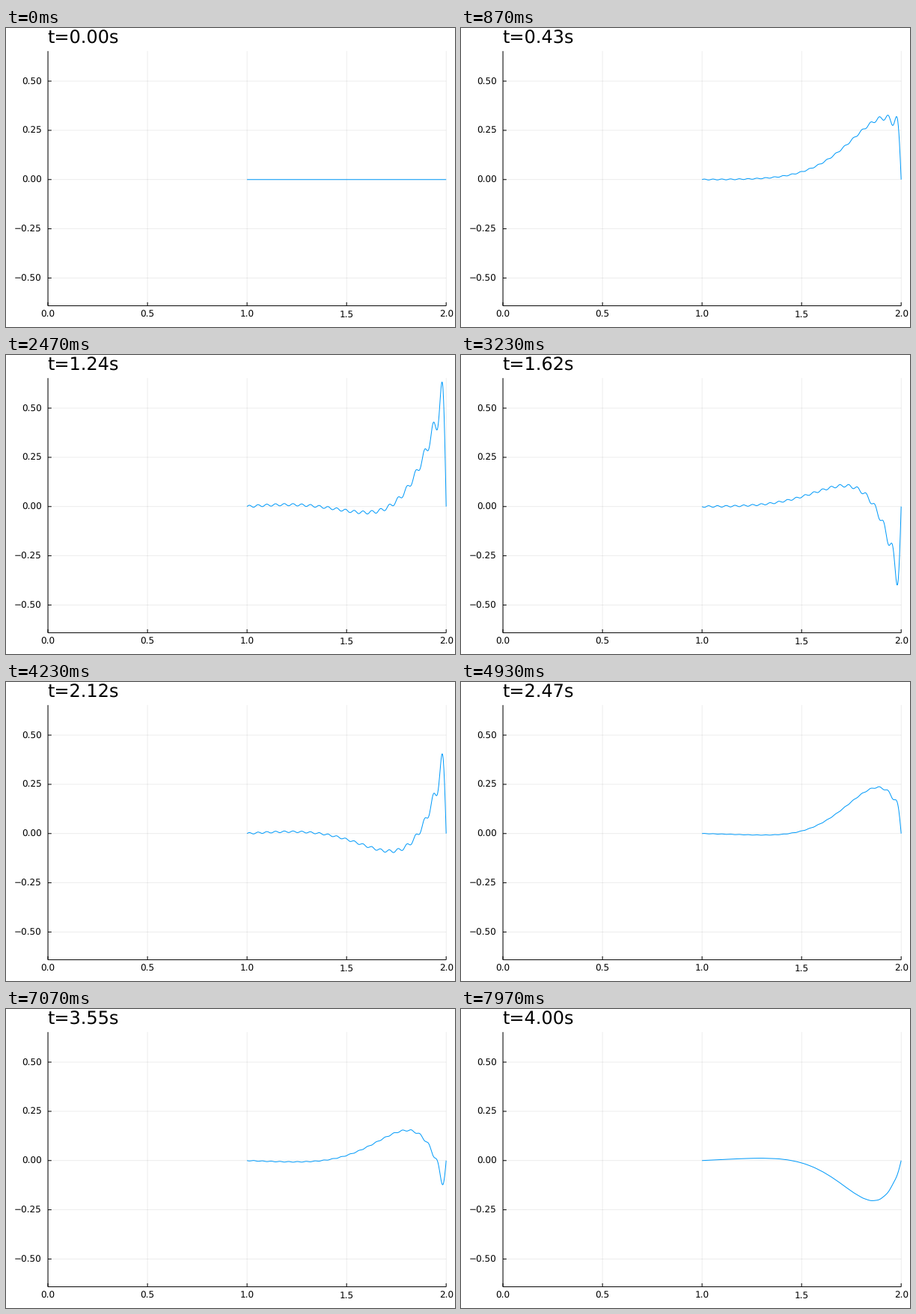
Recreate the animation shown at these times as a matplotlib script. Size 600 px wide and 400 px high, loop 8000 ms.

```python
import numpy as np
import matplotlib.pyplot as plt
from matplotlib.animation import FuncAnimation

# Viscous flow in an annulus 1 < r < 2 whose outer wall oscillates,
# expanded in a truncated set of radial eigenmodes.
TICK_MS = 20
TICKS = 400
DT = 5 / 299
NU = 0.1
AMP = 0.6
OMEGA = 2 * np.pi
MODES = 45
CELLS = 700

# Stage layout in pixels
LEFT, RIGHT, TOP, BOTTOM = 56.05, 588.19, 30.87, 371.61
ZERO_Y, UNIT_Y = 202.75, 263.4
TICK_LEN = 4.72
PX = 0.72  # points per pixel at 100 dpi

plt.rcParams["font.family"] = "DejaVu Sans"
plt.rcParams["text.hinting"] = "none"


def to_x(r):
    return LEFT + r * (RIGHT - LEFT) / 2


def to_y(u):
    return ZERO_Y - u * UNIT_Y


def radial_modes():
    """Decay rates, shapes and wall forcing for w = u * sqrt(r)."""
    h = 1 / CELLS
    r = np.linspace(1, 2, CELLS + 1)
    inner = r[1:-1]
    side = np.full(CELLS - 2, -1 / h**2)
    op = np.diag(2 / h**2 + 0.75 / inner**2) + np.diag(side, 1) + np.diag(side, -1)
    lam, vec = np.linalg.eigh(op)
    lam, vec = lam[:MODES], vec[:, :MODES]
    force = NU * AMP * np.sqrt(2) * vec[-1] / h**2
    return r, NU * lam, vec / np.sqrt(inner)[:, None], force


R, RATE, SHAPE, FORCE = radial_modes()


def velocity(t):
    a = RATE * np.sin(OMEGA * t) - OMEGA * np.cos(OMEGA * t)
    a = FORCE * (a + OMEGA * np.exp(-RATE * t)) / (RATE**2 + OMEGA**2)
    return np.concatenate(([0], SHAPE @ a, [0]))


fig = plt.figure(figsize=(6, 4), dpi=100, facecolor="white")
ax = fig.add_axes([0, 0, 1, 1])
ax.set_xlim(0, 600)
ax.set_ylim(400, 0)
ax.axis("off")


def line(xs, ys, width=1.0, alpha=1.0):
    ax.plot(xs, ys, color="black", lw=width * PX, alpha=alpha, snap=False,
            solid_capstyle="butt")


def grid(xs, ys):
    line(xs, ys, width=0.7, alpha=0.1)


def label(x, y, text, size, ha):
    return ax.text(x, y, text, fontsize=size * PX, ha=ha, va="baseline",
                   color="black")


for v in (0, 0.5, 1, 1.5, 2):
    x = to_x(v)
    grid([x, x], [TOP, BOTTOM])
    line([x, x], [BOTTOM, BOTTOM - TICK_LEN])
    label(x, 387.2, f"{v:.1f}", 12, "center")

for v in (-0.5, -0.25, 0, 0.25, 0.5):
    y = to_y(v)
    grid([LEFT, RIGHT], [y, y])
    line([LEFT, LEFT + TICK_LEN], [y, y])
    label(48, y + 4.32, f"{v:.2f}".replace("-", "\u2212"), 12, "right")

line([LEFT, LEFT], [TOP, BOTTOM])
line([LEFT, RIGHT], [BOTTOM, BOTTOM])

title = label(55, 21, "", 24, "left")
curve, = ax.plot([], [], color="#009afa", lw=PX, zorder=3, snap=False,
                 solid_joinstyle="round", solid_capstyle="butt")


def draw(i):
    # 30 steps per second, placed on 20 ms ticks
    t = (3 * i + 2) // 5 * DT
    title.set_text(f"t={t:.2f}s")
    curve.set_data(to_x(R), to_y(velocity(t)))
    return title, curve


anim = FuncAnimation(fig, draw, frames=TICKS, interval=TICK_MS,
                     init_func=lambda: draw(0), repeat=True, repeat_delay=0)
plt.show()
```
